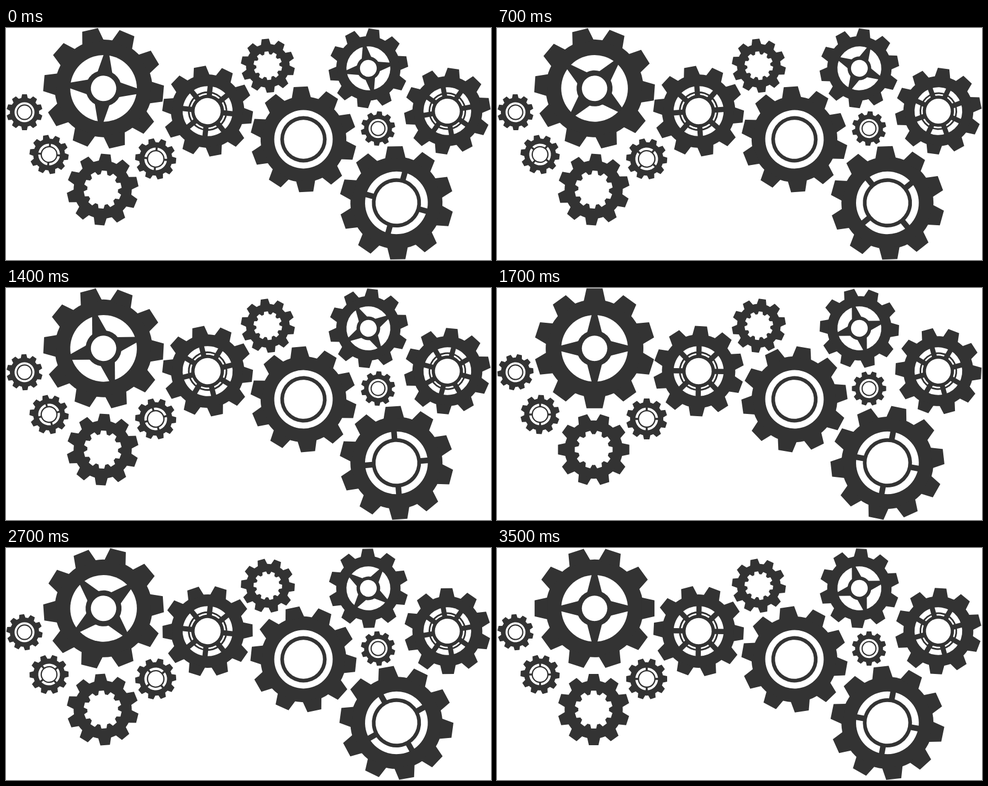
Animation of 878 by 420 pixels, one loop 3600 ms. Source, as an HTML page with a canvas:

```html
<!DOCTYPE html>
<html lang="en">
<head>
<meta charset="utf-8">
<title>Turning gears</title>
<style>
html, body { margin: 0; width: 100%; height: 100%; overflow: hidden; background: #fff; }
canvas { display: block; }
</style>
</head>
<body>
<canvas id="stage" width="878" height="420"></canvas>
<script>
const ctx = document.getElementById('stage').getContext('2d');
const DARK = '#333', LIGHT = '#fff';
const STEP_MS = 100, STEPS = 36, STEP_DEG = 5, TEETH = 10;

// x, y, radius, tooth angle, spoke angle, hub style
const gears = [
  [176.6, 109.3, 108.5, 23, 5, star],
  [656, 73, 71.5, 8, -10, star],
  [365, 150.5, 81.5, -10, 6, wheel],
  [799, 150.5, 77.7, 8, -10, wheel],
  [538.5, 201.5, 95.3, -3, 0, ring],
  [33.5, 152.5, 32.5, 0, 0, ring],
  [673.5, 182, 31, 5, 0, ring],
  [706.8, 316.5, 102.3, -1.4, 15.5, crossed],
  [78, 229, 35.3, -10, 5, crossed],
  [271, 237, 37, -13, 5, crossed],
  [474, 68.3, 48.6, -5.5, -5.5, toothed],
  [175, 292.5, 64.6, 5, 5, toothed]
];

const rad = deg => deg * Math.PI / 180;

function disc(r, color) {
  ctx.fillStyle = color;
  ctx.beginPath();
  ctx.arc(0, 0, r, 0, 2 * Math.PI);
  ctx.fill();
}

function cog(scale, color) {
  disc(0.815 * scale, color);
  ctx.beginPath();
  for (let i = 0; i < TEETH; i++) {
    ctx.save();
    ctx.rotate(i * 2 * Math.PI / TEETH);
    ctx.scale(scale, scale);
    ctx.moveTo(-0.183, -0.78);
    ctx.lineTo(-0.134, -1);
    ctx.lineTo(0.134, -1);
    ctx.lineTo(0.183, -0.78);
    ctx.closePath();
    ctx.restore();
  }
  ctx.fill();
}

// Tapered bars from radius a (half width wa) out to radius b (half width wb)
function spokes(count, a, wa, b, wb) {
  ctx.fillStyle = DARK;
  for (let i = 0; i < count; i++) {
    ctx.save();
    ctx.rotate(i * 2 * Math.PI / count);
    ctx.beginPath();
    ctx.moveTo(-wa, -a);
    ctx.lineTo(-wb, -b);
    ctx.lineTo(wb, -b);
    ctx.lineTo(wa, -a);
    ctx.fill();
    ctx.restore();
  }
}

function star() {
  disc(0.556, LIGHT);
  spokes(4, 0.26, 0.125, 0.57, 0.045);
  disc(0.3, DARK);
  disc(0.212, LIGHT);
}

function ring() {
  disc(0.555, LIGHT);
  disc(0.44, DARK);
  disc(0.37, LIGHT);
}

function crossed() {
  disc(0.555, LIGHT);
  spokes(4, 0.4, 0.05, 0.57, 0.05);
  disc(0.435, DARK);
  disc(0.37, LIGHT);
}

function wheel() {
  disc(0.556, LIGHT);
  disc(0.438, DARK);
  disc(0.4, LIGHT);
  disc(0.365, DARK);
  spokes(8, 0.32, 0.058, 0.57, 0.058);
  disc(0.29, LIGHT);
}

function toothed() {
  cog(0.53, LIGHT);
}

function draw(now) {
  const turn = Math.floor(now / STEP_MS) % STEPS * STEP_DEG;
  ctx.fillStyle = LIGHT;
  ctx.fillRect(0, 0, 878, 420);
  for (const [x, y, r, tooth, spoke, hub] of gears) {
    ctx.save();
    ctx.translate(x, y);
    ctx.scale(r, r);
    ctx.rotate(rad(tooth + turn));
    cog(1, DARK);
    ctx.rotate(rad(spoke - tooth));
    hub();
    ctx.restore();
  }
}

const start = performance.now();
function tick() {
  draw(performance.now() - start);
  requestAnimationFrame(tick);
}
tick();
</script>
</body>
</html>
```
